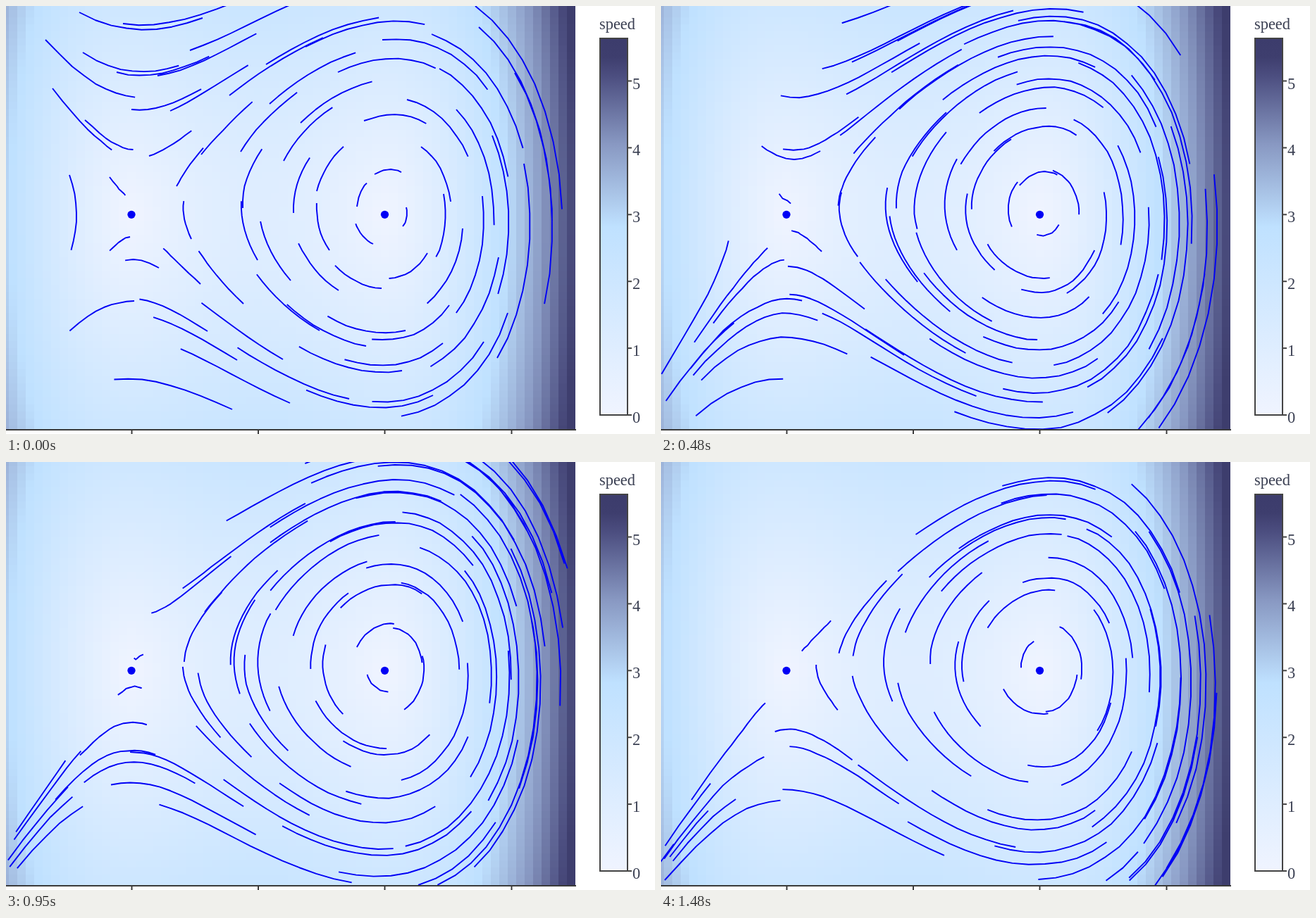
These frames come from a looping animation (921 px wide and 608 px high, 1.58 s). An HTML page with a canvas:

```html
<!DOCTYPE html>
<html lang="en">
<head>
<meta charset="utf-8">
<title>Phase portrait</title>
<style>
html, body { margin: 0; width: 100%; height: 100%; overflow: hidden; background: #fff; }
canvas { display: block; }
</style>
</head>
<body>
<canvas id="stage" width="921" height="608"></canvas>
<script>
const ctx = document.getElementById('stage').getContext('2d');
const PLOT_W = 808, PLOT_H = 601;
const X0 = 357.5, Y0 = 296, SX = 179.6, SY = 152.3;
const CELL_X = 12, CELL_Y = 10;
const DT = 0.07, TRAIL = 13, WARMUP = 8, MAX_SPEED = 5.63;

// Vector field: x' = y, y' = 1 - x^2
const field = (px, py) => {
  const x = (px - X0) / SX, y = (Y0 - py) / SY;
  return [y, 1 - x * x];
};

// The particles read the field from the lower left corner of their cell.
const snapX = px => PLOT_W - Math.ceil((PLOT_W - px) / CELL_X) * CELL_X;
const snapY = py => Y0 + Math.ceil((py - Y0) / CELL_Y) * CELL_Y;

// Frame durations in ms
const LONG = [0, 12, 19, 38];
const MEDIUM = [2, 4, 6, 8, 10, 14, 16, 20, 22, 24, 26, 30, 35];
const durations = Array.from({ length: 39 }, (_, i) =>
  LONG.includes(i) ? 100 : MEDIUM.includes(i) ? 40 : 30);
const LOOP = durations.reduce((a, b) => a + b);

// Start points of the particles, x and y in turn
const STARTS = [
  104, 9, 166, 25, 56, 48, 109, 66, 157, 94, 215, 99, 261, 63, 178, 147,
  233, 149, 317, 127, 369, 83, 425, 58, 66, 117, 112, 162, 203, 213, 242, 256,
  277, 211, 333, 207, 394, 220, 374, 139, 418, 166, 471, 94, 534, 48, 604, 40,
  615, 89, 508, 163, 569, 133, 639, 147, 589, 200, 441, 263, 408, 294, 336, 287,
  357, 361, 404, 390, 459, 347, 472, 404, 533, 401, 598, 351, 621, 267, 648, 316,
  676, 270, 690, 184, 699, 357, 735, 224, 712, 436, 722, 95, 671, 30, 666, 0,
  629, 425, 567, 461, 678, 477, 620, 479, 562, 518, 606, 553, 511, 483, 445, 461,
  403, 564, 393, 502, 328, 503, 286, 462, 182, 419, 337, 423, 276, 395, 217, 372,
  176, 328, 90, 240, 147, 243, 263, 331, 521, 338, 498, 285, 523, 239, 568, 286,
  487, 558, 321, 573
];

// Euler path; a particle rests where it would leave the domain.
function trace(x, y) {
  const path = [[x, y]];
  const steps = WARMUP + durations.length - 1;
  for (let i = 0; i < steps; i++) {
    const [u, v] = field(snapX(x), snapY(y));
    const nx = x + u * DT * SX, ny = y - v * DT * SY;
    if (x < 789 && nx > -3 && ny < 604) { x = nx; y = ny; }
    path.push([x, y]);
  }
  return path;
}
const paths = [];
for (let i = 0; i < STARTS.length; i += 2) paths.push(trace(STARTS[i], STARTS[i + 1]));

const STOPS = [
  [0, 240, 244, 255], [0.5, 191, 225, 255], [0.72, 136, 152, 194],
  [0.9, 76, 78, 128], [0.95, 62, 62, 110], [1, 60, 60, 108]
];
function shade(t) {
  t = Math.min(t, 1);
  const k = Math.max(1, STOPS.findIndex(s => s[0] >= t));
  const a = STOPS[k - 1], b = STOPS[k], f = (t - a[0]) / (b[0] - a[0]);
  return `rgb(${[1, 2, 3].map(c => Math.round(a[c] + (b[c] - a[c]) * f))})`;
}

function line(g, x1, y1, x2, y2) {
  g.beginPath();
  g.moveTo(x1, y1);
  g.lineTo(x2, y2);
  g.stroke();
}

function drawBackground() {
  const c = document.createElement('canvas');
  c.width = 921;
  c.height = 608;
  const g = c.getContext('2d');
  g.fillStyle = '#fff';
  g.fillRect(0, 0, 921, 608);
  for (let x = PLOT_W - CELL_X; x > -CELL_X; x -= CELL_X) {
    for (let y = -4; y < PLOT_H; y += CELL_Y) {
      const [u, v] = field(x + CELL_X / 2, y + CELL_Y / 2);
      g.fillStyle = shade(Math.hypot(u, v) / MAX_SPEED);
      g.fillRect(x, y, CELL_X, Math.min(CELL_Y, PLOT_H - y));
    }
  }

  const bar = g.createLinearGradient(0, 581, 0, 46);
  for (const [t] of STOPS) bar.addColorStop(t, shade(t));
  g.fillStyle = bar;
  g.fillRect(843, 46, 39, 535);
  g.strokeStyle = '#444';
  g.lineWidth = 2;
  g.strokeRect(843, 46, 39, 535);
  g.fillStyle = '#3a3f52';
  g.font = '22.4px "Liberation Serif", "Times New Roman", serif';
  g.fillText('speed', 842, 33);
  for (let i = 0; i < 6; i++) {
    const y = 581 - i * 94.9;
    line(g, 882, y, 888, y);
    g.fillText(i, 889, y + 11);
  }
  return c;
}
const background = drawBackground();

function drawAxes() {
  ctx.strokeStyle = '#3a3a3a';
  ctx.lineWidth = 2;
  line(ctx, 0, 602, 809, 602);
  for (const x of [178.5, 358, 537.5, 717.5]) line(ctx, x, 602, x, 608);
}

function draw(frame) {
  const head = WARMUP + frame, tail = Math.max(0, head - TRAIL);
  ctx.drawImage(background, 0, 0);
  ctx.save();
  ctx.beginPath();
  ctx.rect(0, 0, PLOT_W, PLOT_H);
  ctx.clip();
  ctx.strokeStyle = ctx.fillStyle = '#0000f5';
  ctx.lineWidth = 1.9;
  ctx.lineJoin = 'round';
  ctx.beginPath();
  for (const path of paths) {
    ctx.moveTo(...path[tail]);
    for (let i = tail + 1; i <= head; i++) ctx.lineTo(...path[i]);
  }
  ctx.stroke();
  for (const x of [178, 537.5]) {
    ctx.beginPath();
    ctx.arc(x, Y0 + 0.3, 5.6, 0, 7);
    ctx.fill();
  }
  ctx.restore();
  drawAxes();
}

function frameAt(ms) {
  let i = 0;
  while (ms >= durations[i]) ms -= durations[i++];
  return i;
}

let start = null, shown = -1;
function tick(now) {
  if (start === null) start = now;
  const frame = frameAt((now - start) % LOOP);
  if (frame !== shown) draw(shown = frame);
  requestAnimationFrame(tick);
}
draw(0);
requestAnimationFrame(tick);
</script>
</body>
</html>
```
